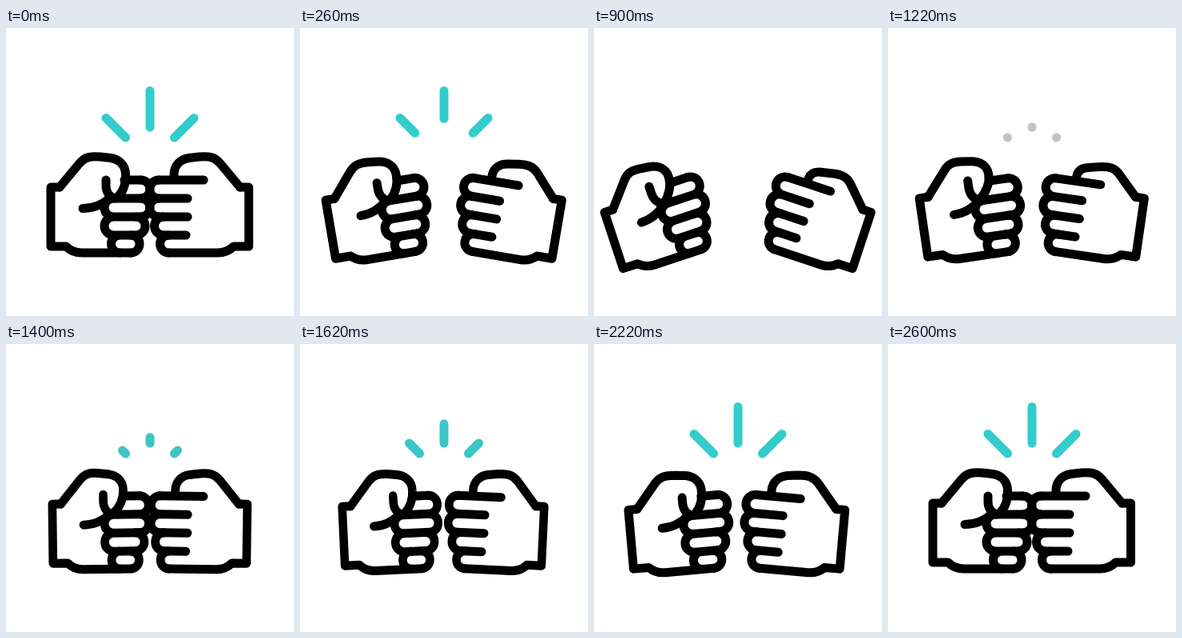
An HTML page that plays this animation: 360x360 px, repeating every 3600 ms.

```html
<!DOCTYPE html>
<html lang="en">
<head>
<meta charset="utf-8">
<title>Fist bump</title>
<style>
  html, body { margin: 0; width: 100%; height: 100%; overflow: hidden; background: #fff; }
  svg { display: block; width: 100%; height: 100%; }
  path { fill: none; stroke-width: 11; stroke-linecap: round; stroke-linejoin: round; }

  .hand {
    stroke: #000;
    transform-origin: 150px 236px;
    animation: slide 3.6s infinite, tilt 3.6s infinite, squash 3.6s infinite;
  }
  .left { --recoil: -16.7px; }
  .right { --recoil: -12px; }
  .thumb { animation: thumb 3.6s infinite; }
  .knuckle { animation: knuckle 3.6s infinite; }

  .ray {
    stroke: #33cccc;
    stroke-dasharray: 100 300;
    animation: trim 3.6s infinite, blink 3.6s step-end infinite;
  }

  /* Pull apart, bump, recoil, settle */
  @keyframes slide {
    0% { translate: 0 0; animation-timing-function: ease; }
    23.61% { translate: -36px 0; }
    25% { translate: -36px 0; animation-timing-function: cubic-bezier(.5, 0, .5, 1); }
    40.42%, 41.5% { translate: 0 0; animation-timing-function: ease; }
    58.06%, 58.33% { translate: var(--recoil) 0; animation-timing-function: ease; }
    72.22%, 100% { translate: 0 0; }
  }
  @keyframes tilt {
    0% { rotate: 0deg; animation-timing-function: ease; }
    23.61% { rotate: -18.3deg; }
    25.56% { rotate: -18.3deg; animation-timing-function: cubic-bezier(.5, 0, .5, 1); }
    41.5% { rotate: 0deg; animation-timing-function: ease; }
    58.06%, 58.33% { rotate: -8.3deg; animation-timing-function: ease; }
    72.22%, 100% { rotate: 0deg; }
  }
  @keyframes squash {
    0%, 33.89% { scale: 1 1; }
    45% { scale: .96 1; }
    58.06%, 100% { scale: 1 1; }
  }

  /* The back of each hand loosens while the fists are apart */
  @keyframes thumb {
    0%, 72.22%, 100% {
      d: path("M67 199 L92 169 C99 161 106 160 118 161 L131 162.5 C141 164 149.5 171 149.5 183 C150 196 147 204 140 211 M125 190 L125 197 C125 205 129 211 136 213");
      animation-timing-function: ease-in-out;
    }
    16.67%, 33.89% {
      d: path("M67 199 L92 169 C98 161.5 103 160.5 113 161 L126 162.5 C138 164 146 171 146 182 C146 194 140 203 130 212 M119 186 L119 195 C119 203 123 210 130 212");
      animation-timing-function: cubic-bezier(.05, .7, .5, .75);
    }
  }
  @keyframes knuckle {
    0%, 41.5%, 100% {
      d: path("M67 199 L92 169 C99 161 106 160 118 161 L131 162.5 C141 164 149.5 171 149.5 183 L149.5 188");
      animation-timing-function: ease-in-out;
    }
    16.67%, 33.89% {
      d: path("M67 199 L92 173 C98 167 104 166 114 167.5 L131 171 C138 172.5 143 176 143.5 183 L143.5 188");
    }
  }

  /* Rays are wiped outwards, then grow outwards again */
  @keyframes trim {
    0% { stroke-dashoffset: 0; animation-timing-function: cubic-bezier(.333, 0, .667, 1); }
    23.06% { stroke-dashoffset: -100; animation-timing-function: step-end; }
    33.2% { stroke-dashoffset: 99.5; animation-timing-function: cubic-bezier(.333, 0, .667, 1); }
    56%, 100% { stroke-dashoffset: 0; }
  }
  @keyframes blink {
    0% { opacity: 1; stroke: #33cccc; }
    23.06% { opacity: 0; stroke: #c4c4c4; }
    33.61% { opacity: 1; stroke: #c4c4c4; }
    34.2% { opacity: 1; stroke: #43c1c4; animation-timing-function: linear; }
    56%, 100% { opacity: 1; stroke: #33cccc; }
  }
</style>
</head>
<body>
<svg viewBox="0 0 360 360">
  <defs>
    <g id="fist">
      <path d="M67 199 H56 V273 H75 C80 278 86 281 95 281 H156"/>
      <path d="M168.5 190 a11.5 11.5 0 0 1 0 23 a11.5 11.5 0 0 1 0 23 M162.5 236 a11.5 11.5 0 0 1 0 23 M156 259 a11 11 0 0 1 0 22"/>
    </g>
  </defs>

  <path class="ray" pathLength="100" d="M180 124 V78.5"/>
  <path class="ray" pathLength="100" d="M149.5 137 L125 112.5"/>
  <path class="ray" pathLength="100" d="M210.5 137 L235 112.5"/>

  <g class="hand left">
    <use href="#fist"/>
    <path class="thumb"/>
    <path d="M96 225.5 C110 225.5 120 221 129 213"/>
    <path d="M148 190 H168.5 M168.5 213 H134.5 a11.5 11.5 0 0 0 0 23 H168.5 M134.5 236 a11.5 11.5 0 0 0 0 23 H162.5 M142.5 259 a11 11 0 0 0 0 22"/>
  </g>

  <g transform="translate(359.5 0) scale(-1 1)">
    <g class="hand right">
      <use href="#fist"/>
      <path class="knuckle"/>
      <path d="M168.5 190 H112.5 M168.5 213 H132.5 M168.5 236 H132.5 M162.5 259 H134.5"/>
    </g>
  </g>
</svg>
</body>
</html>
```
